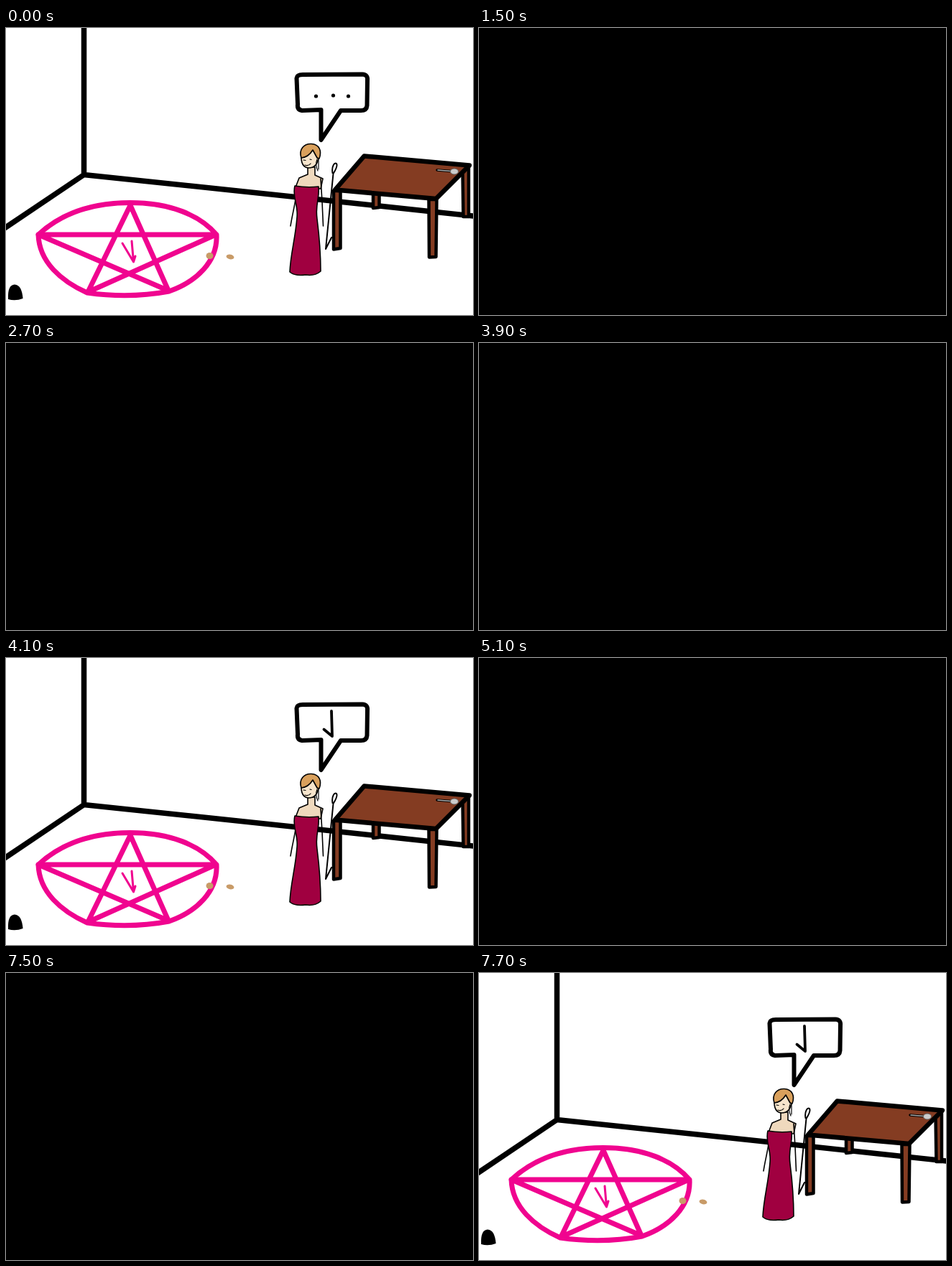
Write an HTML page that moves like this. It is 650 px wide and 400 px high and loops after 8 s.

```html
<!DOCTYPE html>
<html lang="en">
<head>
<meta charset="utf-8">
<style>
  html, body { margin: 0; width: 100%; height: 100%; overflow: hidden; background: #fff; }
  svg { display: block; width: 650px; height: 400px; }
  .line { fill: none; stroke: #000; stroke-linecap: round; stroke-linejoin: round; }
  .wood { fill: #843c22; stroke: #000; stroke-linejoin: round; }
</style>
</head>
<body>
<svg viewBox="0 0 650 400">
  <!-- room -->
  <path class="line" stroke-width="7.5" d="M108.500-4V204.500L-5 281M108.500 204.500L398 235L654 262.500"/>
  <path d="M3 378Q2 358 12 357.500Q22 358 23.500 377Q13 381 3 378Z"/>

  <!-- pentagram -->
  <g fill="none" stroke="#f0048f" stroke-width="7" stroke-linejoin="round" stroke-linecap="round">
    <path d="M45 288C75 260 117 243.500 173 243.500C229 243.500 270 261 293 288C295 326 264 354 227 367C190 374 148 374 113 369C77 353 46 326 45 288Z"/>
    <path d="M173 247L114 368L292 288H45L226 366Z"/>
    <path stroke-width="3" d="M162 300L177.500 326L175 297M177.500 326L180 318"/>
  </g>
  <g fill="#c89b68">
    <ellipse cx="283.500" cy="317.500" rx="5" ry="4.500"/>
    <ellipse cx="312" cy="319" rx="5.500" ry="3.300" transform="rotate(10 312 319)"/>
  </g>

  <!-- table -->
  <g class="wood" stroke-width="4.500">
    <path d="M511 230H519.500V250L511 251ZM635.500 198L644 192V263H636.500Z"/>
    <path d="M456 227H465.500V307L456 308.500ZM588.500 239H599.500L598.500 319L589 319.500Z"/>
    <path stroke-width="6.500" d="M498.500 178.500L645 191.500L598.500 238L458 225.500Z"/>
  </g>
  <path class="line" stroke-width="3.500" d="M600 198L619 199.500"/>
  <path class="line" style="stroke:#aaa" stroke-width="1.500" d="M601 198L619 199.500"/>
  <ellipse cx="624" cy="200" rx="5.500" ry="4" fill="#ccc" stroke="#666"/>

  <!-- staff -->
  <path class="line" stroke-width="2" d="M454.500 202C453 193 457 187 460 189C462 192 458 199 455.500 203L445 308L453 292"/>

  <!-- woman -->
  <g class="line" stroke-width="1.600">
    <path fill="#efd9bd" d="M420 194V204L408 209L403 222L438 224L441 210L430 205V194Z"/>
    <path d="M404 232C402 248 398 262 396 276M438 210L440 242L441.500 276"/>
    <path fill="#f7e5cc" d="M411 177Q410 194 421 195Q434 195 435 179L427 170Z"/>
    <path fill="#d9a05c" d="M411 181C407 169 415 161 425 161.500C436 162 440 171 436 182L433 181L427 170Q421 180 411 181Z"/>
    <path stroke-width="1.200" d="M414 184L417 184.500M423 183L425 183.500M416 191Q421 193 424 189M433 183Q430 191 434 199M435 183V197"/>
    <path fill="#a00040" d="M402 220Q419 223 435 221C437 236 430 246 433 266C436 290 438 315 438 339Q430 346 417 344Q402 346 395 340C396 315 403 292 405 264C407 246 398 236 402 220Z"/>
  </g>

  <!-- speech bubble -->
  <path class="line" stroke-width="6" d="M438.500 114L412 115Q405 114 406 106L404.500 70Q405 65 413 65L496 64.500Q504 65 503 73L502.500 108Q502 115 494 115H466L438.500 156Z"/>
  <g id="dots"><circle cx="431.500" cy="95" r="2.600"/><circle cx="455.500" cy="94" r="2.600"/><circle cx="476.500" cy="95" r="2.600"/></g>
  <path id="arrow" class="line" stroke-width="3.800" d="M453 74L454 109L442.500 99.500"/>

  <rect id="blackout" width="650" height="400"/>
</svg>
<script>
  const LOOP = 8000, DOTS = 500, CYCLE = 1200, LIT = 1000;
  const [dots, arrow, blackout] = ["dots", "arrow", "blackout"].map(id => document.getElementById(id));
  const show = (el, on) => el.style.display = on ? "" : "none";

  function draw() {
    const t = performance.now() % LOOP;
    show(dots, t < DOTS);
    show(arrow, t >= DOTS);
    show(blackout, t >= DOTS && (t - DOTS) % CYCLE >= LIT);
    requestAnimationFrame(draw);
  }
  draw();
</script>
</body>
</html>
```
